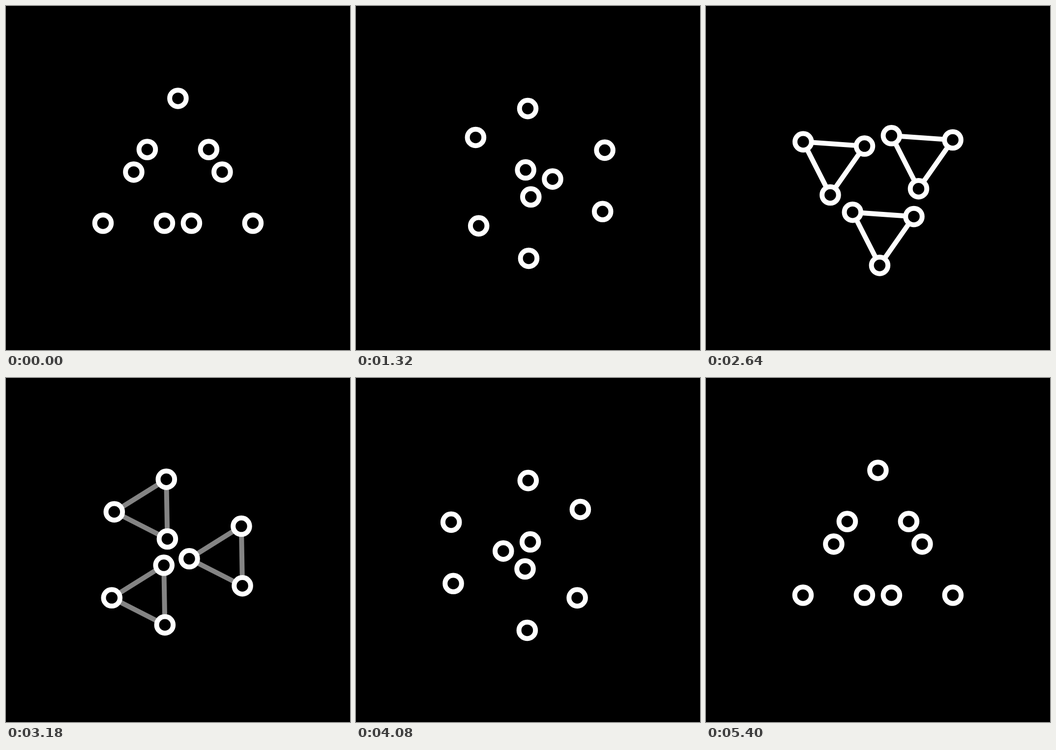
An HTML page with a canvas that plays this animation: 700x700 px, repeating every 5.43 s.

```html
<!DOCTYPE html>
<html lang="en">
<head>
<meta charset="utf-8">
<title>Counter-rotating triangles</title>
<style>
  html, body { margin: 0; width: 100%; height: 100%; overflow: hidden; background: #000; }
  canvas { display: block; }
</style>
</head>
<body>
<canvas id="stage" width="700" height="700"></canvas>
<script>
const ctx = document.getElementById('stage').getContext('2d');
const STEP = 30, STEPS = 181;
const CENTER = { x: 349.9, y: 358.1 };

// Each group turns clockwise around the centre while its corners turn back
// by the same angle; shift is the offset of the corners from the group's pivot.
const groups = [
  { x: 0, y: -110.15, shift: 9.35 },
  { x: -90, y: 41.65, shift: 7.55 },
  { x: 90, y: 41.65, shift: 7.55 }
];
const corners = [[0, -69.35], [-62.5, 34.67], [62.5, 34.67]];

function rotate(x, y, a) {
  const c = Math.cos(a), s = Math.sin(a);
  return [x * c - y * s, x * s + y * c];
}

function groupPoints(g, a) {
  const [gx, gy] = rotate(g.x, g.y, a);
  return corners.map(([x, y]) => {
    const [dx, dy] = rotate(x, y + g.shift, -a);
    return [CENTER.x + gx + dx, CENTER.y + gy + dy];
  });
}

function drawLines(points, alpha) {
  ctx.beginPath();
  points.forEach(([x, y]) => ctx.lineTo(x, y));
  ctx.closePath();
  ctx.strokeStyle = `rgba(255,255,255,${alpha})`;
  ctx.stroke();
}

function drawRing([x, y]) {
  ctx.beginPath();
  ctx.arc(x, y, 16.8, 0, Math.PI * 2);
  ctx.fillStyle = '#000';
  ctx.fill();
  ctx.strokeStyle = '#fff';
  ctx.stroke();
}

function draw(ms) {
  const step = Math.floor(ms / STEP) % STEPS;
  const a = step * Math.PI / 90;
  const alpha = Math.max(0, -Math.cos(a)) ** 4;

  ctx.fillStyle = '#000';
  ctx.fillRect(0, 0, 700, 700);
  ctx.lineWidth = 10;

  const all = groups.map(g => groupPoints(g, a));
  if (alpha > 0.004) all.forEach(points => drawLines(points, alpha));
  all.flat().forEach(drawRing);
}

const start = performance.now();
function tick() {
  draw(performance.now() - start);
  requestAnimationFrame(tick);
}
tick();
</script>
</body>
</html>
```
